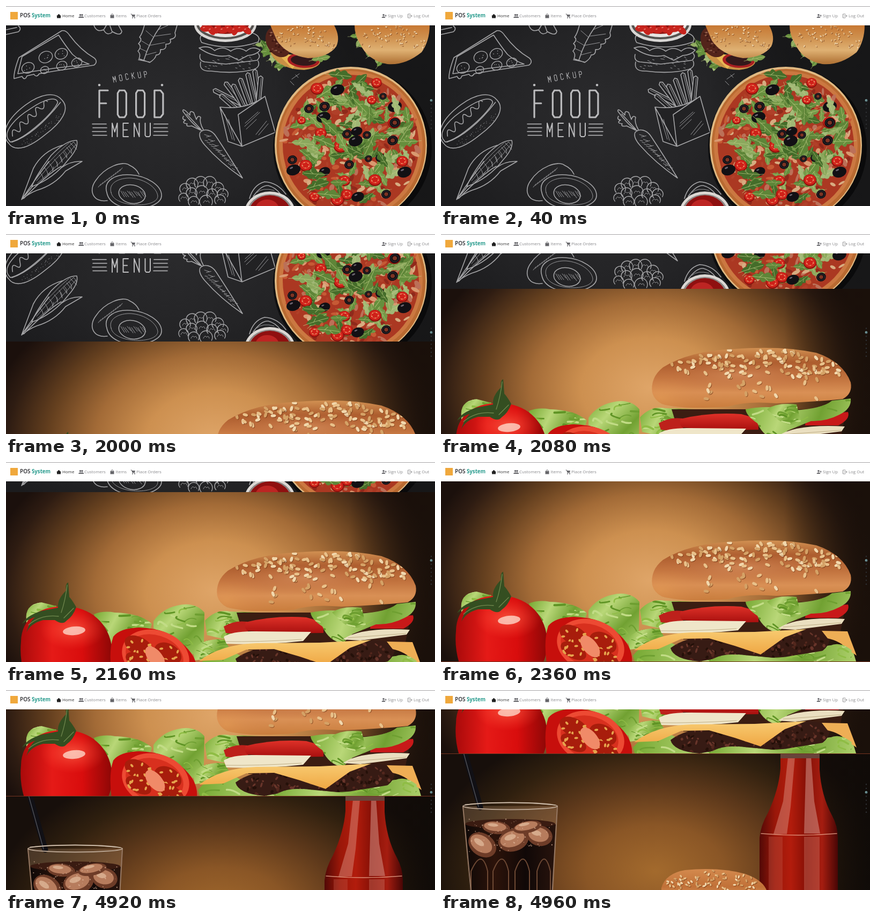
Recreate the animation shown at these times as an HTML page with a canvas. Size 800x372 px, loop 5000 ms.

```html
<!DOCTYPE html>
<html lang="en">
<head>
<meta charset="utf-8">
<title>POS System</title>
<style>
html, body { margin: 0; width: 100%; height: 100%; overflow: hidden; background: #fff; }
canvas { display: block; }
</style>
</head>
<body>
<canvas id="stage" width="800" height="372"></canvas>
<script>
const W = 800, H = 372, TOP = 36, PAGE = H - TOP, LOOP = 5000, STEP = 40;
const stage = document.getElementById('stage').getContext('2d');
const CHALK = '#a5a5a7';
let g = stage, seed = 7;

function rnd(a = 0, b = 1) {
  seed = (seed * 16807) % 2147483647;
  return a + (b - a) * seed / 2147483647;
}
const pick = list => list[Math.floor(rnd(0, list.length))];

function fill(color, d) { g.fillStyle = color; g.fill(new Path2D(d)); }
function line(color, w, d) { g.strokeStyle = color; g.lineWidth = w; g.stroke(new Path2D(d)); }
function oval(color, x, y, rx, ry = rx, rot = 0) {
  g.fillStyle = color;
  g.beginPath(); g.ellipse(x, y, rx, ry, rot, 0, 7); g.fill();
}
function ring(color, w, x, y, rx, ry = rx, rot = 0) {
  g.strokeStyle = color; g.lineWidth = w;
  g.beginPath(); g.ellipse(x, y, rx, ry, rot, 0, 7); g.stroke();
}
function box(color, x, y, w, h) { g.fillStyle = color; g.fillRect(x, y, w, h); }
function shade(x0, y0, x1, y1, ...colors) {
  const s = g.createLinearGradient(x0, y0, x1, y1);
  colors.forEach((c, i) => s.addColorStop(i / (colors.length - 1), c));
  return s;
}
function at(x, y, rot, scale, draw) {
  g.save(); g.translate(x, y); g.rotate(rot); g.scale(scale, scale); draw(); g.restore();
}
function clipped(d, draw) { g.save(); g.clip(new Path2D(d)); draw(); g.restore(); }
function glow(x, y, rx, ry, stops) {
  g.save(); g.translate(x, y); g.scale(rx, ry);
  const r = g.createRadialGradient(0, 0, 0, 0, 0, 1);
  stops.forEach(([p, c]) => r.addColorStop(p, c));
  g.fillStyle = r; g.fillRect(-9, -9, 18, 18); g.restore();
}
function layer(draw) {
  const c = document.createElement('canvas');
  c.width = W; c.height = H;
  g = c.getContext('2d');
  g.lineJoin = g.lineCap = 'round';
  draw();
  return c;
}

// Chalk lettering, each glyph in a unit box
const GLYPHS = {
  M: [[0, 1], [0, 0], [.5, .65], [1, 0], [1, 1]], N: [[0, 1], [0, 0], [1, 1], [1, 0]],
  O: [[.2, 0], [.8, 0], [1, .1], [1, .9], [.8, 1], [.2, 1], [0, .9], [0, .1], [.2, 0]],
  D: [[0, 0], [.7, 0], [1, .12], [1, .88], [.7, 1], [0, 1], [0, 0]],
  C: [[1, .2], [.8, 0], [.2, 0], [0, .1], [0, .9], [.2, 1], [.8, 1], [1, .8]],
  K: [[0, 0], [0, 1], [0, .6], [1, 0], [.3, .45], [1, 1]],
  U: [[0, 0], [0, .9], [.2, 1], [.8, 1], [1, .9], [1, 0]],
  P: [[0, 1], [0, 0], [.8, 0], [1, .12], [1, .4], [.8, .52], [0, .52]],
  E: [[1, 0], [0, 0], [0, .5], [.8, .5], [0, .5], [0, 1], [1, 1]],
  F: [[1, 0], [0, 0], [0, .48], [.8, .48], [0, .48], [0, 1]]
};
function letter(ch, x, y, w, h, weight) {
  g.strokeStyle = '#bcbcbe'; g.lineWidth = weight;
  g.beginPath();
  GLYPHS[ch].forEach(([u, v]) => g.lineTo(x + u * w, y + v * h));
  g.stroke();
}

function lettering() {
  [...'MOCKUP'].forEach((ch, i) =>
    at(202 + i * 11.6, 135 - i * 1.8 + (i - 2.5) ** 2 * .2, -.2, 1, () => letter(ch, -2, -5.5, 4.5, 11, 1)));
  [...'FOOD'].forEach((ch, i) => letter(ch, 174 + i * 34.3, 157, 16, 50, 3.2));
  [...'MENU'].forEach((ch, i) => letter(ch, 198 + i * 20.5, 218, 9.5, 25, 2));
  oval('#bcbcbe', 174, 147, 2.3);
  oval('#bcbcbe', 291, 147, 2.3);
  for (let i = 0; i < 4; i++) {
    line('#bcbcbe', 1.6, `M${161 + i % 2} ${219.5 + i * 7}h26M${276 - i % 2} ${219.5 + i * 7}h26`);
  }
}

function chalkFood() {
  const c = d => line(CHALK, 1.6, d), thin = d => line(CHALK, .9, d);
  // slice of pizza
  c('M104 46Q112 44 119 55Q139 82 165 97Q172 104 164 110L91 121L62 126Q57 134 52 127L39 130Q35 140 30 131L15 135Q14 123 24 96Z');
  c('M98 54Q111 74 124 90Q139 103 155 108M98 54L30 94L22 126L88 116L155 108');
  [[41, 115, 12], [74, 95, 13], [103, 89, 12], [72, 119, 8], [104, 111, 10], [132, 105, 10]].forEach(([x, y, r]) => {
    ring(CHALK, 1.4, x, y, r, r * .8, -.4);
    for (let i = 0; i < 4; i++) oval(CHALK, x + rnd(-r, r) * .55, y + rnd(-r, r) * .5, .8);
  });
  // hot dog
  at(53, 213, -.66, 1, () => {
    c('M-64 4C-66-22-35-34 5-33C39-32 64-20 64 2C66 24 38 34 0 33C-37 34-65 26-64 4Z');
    c('M-60-3C-58-21-22-25 6-22C42-20 60-10 55 0C40 10-34 17-60 4Z');
    c('M-58 6Q-15 21 59 3');
    c('M-50-2q8-15 12-3q4 10 10-3q6-12 10 1q5 9 11-4q6-10 9 2q6 10 11-4q5-9 9 2q5 8 11-3q5-7 8 1');
    for (let i = 0; i < 42; i++) oval(CHALK, rnd(-46, 46), rnd(18, 29), .55);
  });
  // corn
  c('M132 250Q112 249 84 278Q54 318 48 336Q89 321 116 286Q136 264 132 250Z');
  c('M105 259Q68 270 51 302L29 360Q42 349 57 343Q91 333 111 307L142 289Q119 288 103 301M29 360Q53 324 80 289M33 358Q78 312 103 298M50 335L35 353');
  for (let i = 0; i < 8; i++) thin(`M${126 - i * 9} ${253 + i * 8}q${7 - i * .2} 6 ${5 + i * .2} 12M${119 - i * 6} ${254 + i * 9}L${132 - i * 9} ${267 + i * 8}`);
  thin('M126 253Q90 285 57 325M130 258Q101 295 59 329M117 255Q80 286 52 326');
  // avocado
  c('M189 362C163 366 153 344 167 325C184 299 218 287 230 296Q243 302 248 313');
  c('M188 347C181 325 204 312 232 314C264 316 289 334 290 351C293 382 196 390 188 347Z');
  thin('M196 347C190 329 212 319 233 320C260 322 281 338 283 353C284 377 201 376 196 347Z');
  ring(CHALK, 1.6, 235, 350, 25, 17, .2);
  for (let i = 0; i < 11; i++) thin(`M${214 + i * 4} ${344 + i % 3}l${7} ${11 - i % 4}M${172 + i * 4} ${337 - i * 3}l5-6`);
  // cauliflower
  [[334, 340, 10], [347, 331, 11], [363, 329, 12], [380, 329, 12], [395, 339, 11], [404, 350, 10], [331, 357, 9], [399, 361, 10], [346, 348, 10], [365, 346, 12], [384, 350, 10], [350, 364, 10], [373, 364, 12]].forEach(([x, y, r]) => {
    g.strokeStyle = CHALK; g.lineWidth = 1.4;
    g.beginPath(); g.arc(x, y, r, 2.4, 6.8); g.stroke();
    thin(`M${x - 5} ${y + 2}q3-7 6-2q4-4 5 2`);
  });
  // carrot
  c('M362 235C370 227 384 230 392 243Q416 279 441 320Q399 291 371 259C364 251 359 242 362 235Z');
  c('M366 232Q351 224 330 196Q329 190 336 196L343 203Q342 193 350 198L355 211Q358 202 363 207Q360 216 368 230M331 205Q327 211 335 212Q326 218 338 219Q334 225 346 223L363 231M337 201L363 229');
  for (let i = 0; i < 15; i++) thin(`M${370 + i * 3.7} ${239 + i * 4.5}l${9 - i * .3} ${i % 2 ? -2 : 3}M${371 + i * 4} ${250 + i * 3.6}l5 1`);
  // fries
  const fry = (x, y, rot, len) => at(x, y, rot, 1, () => {
    box('#222224', -4, 0, 8, len);
    c(`M-4 0L0-3L4 0V${len}H-4Z`); thin(`M1 1V${len}`);
  });
  fry(389, 157, -1.1, 58); fry(410, 144, -.65, 58); fry(424, 148, -.45, 52); fry(437, 137, -.35, 58);
  fry(451, 127, -.24, 62); fry(464, 121, -.15, 62); fry(475, 133, .1, 48); fry(401, 167, -.85, 45);
  fill('#222224', 'M399 188Q448 194 483 168L502 235L440 261L414 252Z');
  c('M399 188Q448 194 483 168L502 235L440 261L414 252ZM399 188L440 261M433 202L440 261M433 202L483 168');
  thin('M446 218l24-21M445 224l28-26M448 229l19-18M466 239l20-25M471 240l18-21M408 202l14 46M415 211l11 39');
  // burger
  c('M365 68Q356 54 376 49H456Q477 55 470 67Q418 85 365 68ZM360 78Q378 72 389 83Q404 73 419 84Q433 74 448 84Q460 73 474 82Q467 91 451 92L434 101L416 92Q389 98 360 78ZM362 90Q359 102 371 104L410 108L468 101Q476 94 470 88M363 104Q359 122 382 121Q427 127 462 118Q475 113 470 102');
  for (let i = 0; i < 32; i++) thin(`M${rnd(366, 464)} ${rnd(94, 118)}l3 .8`);
  // lettuce
  c('M258 36Q254 52 249 58Q255 62 247 70Q254 75 246 84Q252 89 248 98L268 105Q279 98 280 91Q289 91 288 81Q300 82 298 71Q310 71 306 62Q319 60 315 50L319 36M247 100L267 104M257 101Q267 67 289 36');
  thin('M263 85L250 79M268 74L253 65M275 58L261 46M261 91L280 86M269 73L296 68M278 56L307 52M284 44L302 36');
  c('M0 53L23 48Q30 42 23 37M1 44L20 40M164 36Q169 50 182 44Q188 57 199 48Q214 57 216 47L210 36M183 43l4-7M198 48l-4-11');
  c('M454 358Q461 333 482 327Q506 328 522 350M461 354Q476 333 489 334Q502 337 512 350');
  thin('M468 347Q478 337 500 343M533 136l14-10M530 140l7 7M540 128l5 5');
}

function leaf(x, y, rot, size) {
  at(x, y, rot, size, () => {
    fill(pick(['#5e8538', '#759a49', '#456d2a', '#8ba85d', '#668f3d', '#a0b775']),
      'M-14 0Q-9-5-6-3Q-4-10 1-4Q7-9 10-3Q14-2 16 1Q10 7 4 4Q0 9-4 3Q-8 5-14 0Z');
    line('rgba(190,204,131,.7)', .7, 'M-18 1Q-5 0 14 1M-5 1l4-4M2 1l4 3');
  });
}
function tomato(x, y, r, rot) {
  oval('#8b120d', x, y + 1, r, r * .92);
  oval('#cf2119', x, y, r * .9, r * .82);
  ring('#e9604a', 1, x, y, r * .56, r * .48);
  for (let i = 0; i < 5; i++) oval('#eda26f', x + Math.cos(rot + i * 1.25) * r * .52, y + Math.sin(rot + i * 1.25) * r * .45, 1.4, .9);
}
function olive(x, y, r, whole) {
  oval('#121014', x, y, r * (whole ? 1.2 : 1), r * .9, -.3);
  if (whole) oval('#6b6470', x - r * .35, y - r * .35, r * .3, r * .14, -.4);
  else { oval('#7d3323', x, y, r * .4, r * .38); ring('#3d343a', .9, x, y, r * .75, r * .66); }
}
function pizza() {
  oval('rgba(0,0,0,.55)', 646, 264, 148, 149);
  oval('#e0b982', 643, 259, 142, 146);
  oval('#b96a31', 643.5, 260, 139, 143);
  oval('#cb7841', 643, 259, 134, 138);
  oval('#ab3822', 643, 259, 127, 131);
  for (let i = 0; i < 300; i++) {
    const a = rnd(0, 6.28), r = Math.sqrt(rnd()) * 126;
    oval(pick(['#c65a35', '#d99970', '#b04029', '#8f291b', '#d7ac81', '#bc7058']),
      643 + Math.cos(a) * r, 259 + Math.sin(a) * r, rnd(2, 10), rnd(2, 5), rnd(0, 3));
  }
  const scatter = n => {
    for (let i = 0; i < n; i++) {
      const a = rnd(0, 6.28), r = Math.sqrt(rnd()) * 108;
      leaf(650 + Math.cos(a) * r, 250 + Math.sin(a) * r * 1.04, rnd(0, 6.28), rnd(.7, 1.5));
    }
  };
  scatter(95);
  [[580, 153, 12], [691, 142, 10], [624, 260, 13], [739, 288, 11], [724, 216, 12], [631, 324, 11], [587, 236, 11],
   [551, 212, 8], [559, 296, 12], [688, 323, 12], [682, 174, 9], [575, 354, 10], [636, 350, 11], [618, 360, 12]]
    .forEach(([x, y, r], i) => tomato(x, y, r, i));
  [[618, 156, 11, 1], [725, 187, 11, 1], [592, 207, 11, 1], [565, 191, 9], [594, 187, 10], [725, 217, 10], [652, 251, 11, 1],
   [536, 305, 11, 1], [534, 286, 9], [656, 355, 10, 1], [743, 309, 11, 1], [709, 350, 9], [636, 238, 9], [698, 282, 9],
   [721, 250, 10], [594, 308, 9, 1], [640, 295, 9], [673, 240, 8], [654, 233, 9, 1], [703, 168, 7], [676, 284, 7]]
    .forEach(o => olive(...o));
  [[655, 143, -.8], [622, 128, .1], [663, 187, .8], [745, 233, -1], [569, 263, 1], [592, 251, .4], [712, 292, 1.3], [580, 333, -.3], [601, 350, .1], [679, 258, 2]]
    .forEach(([x, y, a]) => leaf(x, y, a, 1.5));
  scatter(14);
}

function seeds(n, x0, x1, y0, y1, size) {
  for (let i = 0; i < n; i++) {
    const x = rnd(x0, x1), u = (x - x0) / (x1 - x0) * 2 - 1;
    const y = y0 + u * u * (y1 - y0) * .55 + rnd() ** 1.3 * (y1 - y0) * (1 - u * u * .35), a = rnd(-.6, 2);
    oval('rgba(105,48,18,.55)', x + 1, y + 1, size, size * .6, a);
    oval(pick(['#e9c18a', '#f2d8ad', '#d5a266']), x, y, size, size * .55, a);
  }
}

function menuPage() {
  box('#202022', 0, 0, W, H);
  glow(310, 200, 370, 260, [[0, '#2b2b2d'], [.6, '#242426'], [1, '#1c1c1e']]);
  box(shade(500, 0, 800, 0, 'rgba(16,16,17,0)', '#171718'), 500, 36, 300, 336);
  chalkFood();
  lettering();
  // bowl of tomatoes
  oval('#d9d7d5', 409, 35, 58, 32);
  oval('#55524f', 409, 33, 54, 29);
  oval('#e8e5e2', 409, 31, 50, 27);
  oval('#8d1713', 409, 30, 46, 22);
  for (let i = 0; i < 8; i++) {
    oval('#c7241d', 372 + i * 11, 42 + i % 2 * 3, 10, 6, i);
    oval('#e5776a', 369 + i * 11, 40 + i % 2 * 3, 2, 1, -.4);
  }
  // burgers
  for (let i = 0; i < 10; i++) leaf(480 + i * 4, 72 + i * 4, i, 1.1);
  fill('#c99045', 'M487 67L515 89L585 94Q594 114 556 119Q513 118 495 91Z');
  fill('#e7b654', 'M497 79L550 98L534 117Z');
  oval('#53241b', 508, 67, 22, 30, -.5);
  for (let i = 0; i < 40; i++) oval(pick(['#754034', '#91604b', '#3c1712']), rnd(490, 521), rnd(46, 88), 2, 1.4);
  oval('#a91f22', 555, 101, 30, 14, .06);
  oval('#34191b', 555, 101, 24, 10, .06);
  leaf(586, 97, -.2, 1.2);
  const bun = (d, x0, x1) => {
    fill(shade(0, 36, 0, 105, '#c77833', '#cf914f', '#dfb173', '#b37639'), d);
    clipped(d, () => seeds(58, x0, x1, 37, 74, 2));
  };
  bun('M493 36H612Q624 58 616 75Q601 96 563 97Q523 91 505 64Z', 500, 614);
  for (let i = 0; i < 10; i++) leaf(657 + i * 5, 56 + i * 5, i * 2, 1.1);
  bun('M650 36H790Q790 65 775 86Q744 111 711 108Q674 101 660 70Q650 53 650 36Z', 658, 782);
  pizza();
  // sauce bowl
  oval('#dcd8d4', 492, 384, 47, 39);
  oval('#8b8583', 492, 386, 43, 36);
  oval('#8f1010', 492, 388, 40, 36);
  oval('#bd2523', 487, 378, 22, 18);
}

const GREENS = ['#5f9425', '#8fbd45', '#c2dc86', '#6e9f31'];
function lettuce(d, x0, y0, x1, y1) {
  fill(shade(x0, y0, x1, y1, '#75a832', '#b9d778', '#71a132', '#a9cd67'), d);
  clipped(d, () => {
    for (let i = 0; i < 22; i++) {
      const x = rnd(x0, x1), y = rnd(y0, y1);
      line(pick(GREENS), rnd(1, 4), `M${x} ${y}q${rnd(-8, 12)} ${rnd(-10, 4)} ${rnd(12, 26)} ${rnd(-8, 10)}`);
    }
  });
}

function burgerPage() {
  glow(390, 220, 430, 310, [[0, '#dfa568'], [.3, '#cd9050'], [.52, '#a36b37'], [.72, '#65401f'], [.9, '#2e1c12'], [1, '#1b100c']]);
  box(shade(640, 0, 800, 0, 'rgba(24,14,8,0)', '#1a100a'), 640, 36, 160, 336);
  lettuce('M38 275Q34 245 66 241L94 248L83 284H38Z', 38, 240, 95, 285);
  lettuce('M164 263Q182 256 203 260Q250 261 272 281L260 318H180Z', 165, 258, 272, 315);
  lettuce('M275 276Q291 253 319 247Q352 239 370 260L369 316L349 338L307 307L275 289Z', 275, 244, 370, 335);
  lettuce('M348 328Q368 307 407 310L425 340L352 349Z', 350, 307, 420, 347);
  lettuce('M371 275Q392 253 417 258L474 260L463 284L405 309L375 302Z', 371, 256, 474, 308);
  // whole tomato
  const body = 'M28 314C29 269 65 247 111 249C156 249 193 279 198 328Q199 356 190 374H34Q25 345 28 314Z';
  fill(shade(30, 0, 198, 0, '#ac0b0b', '#e51a17', '#d90d0d', '#8d0706'), body);
  clipped(body, () => glow(125, 291, 62, 38, [[0, 'rgba(255,105,77,.7)'], [1, 'rgba(255,70,50,0)']]));
  oval('rgba(255,224,210,.75)', 127, 294, 21, 8, -.1);
  fill('#344e21', 'M92 260Q78 259 64 263Q46 269 38 297Q46 280 69 274L91 274Q106 284 113 275Q125 267 131 250Q123 236 118 231L116 204Q110 206 112 219Q95 236 97 251L66 257Q38 266 30 281Q48 267 69 266Z');
  line('#71884f', 1.3, 'M114 209Q111 236 103 260M98 267Q65 263 42 283M108 270L126 252');
  // half tomato
  const cut = 'M200 305Q212 289 248 288Q300 289 328 317Q359 343 356 374H197Q191 332 200 305Z';
  fill('#c70f0c', cut);
  oval('#ed4a33', 279, 341, 64, 48, .3);
  oval('#d8301e', 277, 341, 55, 39, .3);
  [[248, 323, 29, 17], [302, 336, 27, 18], [247, 351, 26, 14], [306, 365, 28, 14]].forEach(([x, y, rx, ry], i) => {
    oval('#a81d0c', x, y, rx, ry, .5);
    for (let k = 0; k < 9; k++) oval('#e6a44d', x + Math.cos(k + i) * rx * .7, y + Math.sin(k + i) * ry * .65, 3.6, 2, k);
  });
  oval('#f08a68', 278, 343, 13, 24, -.7);
  // burger filling
  fill('#3b1d12', 'M430 260H756L742 330H452Z');
  fill('#bd211b', 'M406 286Q425 274 450 277L452 302L410 298Z');
  fill(shade(0, 266, 0, 300, '#e2332a', '#a50e0d'), 'M447 278Q501 265 560 269L592 278V298Q516 299 450 294Q443 287 447 278Z');
  fill('#c81919', 'M681 273L759 265Q764 278 741 290H679Z');
  lettuce('M568 260Q610 251 659 262Q711 259 729 244L764 240Q766 259 743 270Q718 283 690 282L646 300L628 317Q602 313 590 286Q569 272 568 260Z', 570, 242, 764, 315);
  lettuce('M608 260Q626 247 663 251L671 282Q656 296 629 280Z', 610, 249, 670, 289);
  fill('#efe6c9', 'M406 305Q422 294 465 295L569 296L554 313Q480 321 411 318Z');
  fill('#eadfc0', 'M628 310Q661 287 753 292L747 301L661 312Z');
  line('#bfae86', 1, 'M409 314Q467 315 551 310M638 307L746 299');
  lettuce('M358 360Q386 326 421 332L470 357H650Q721 336 765 341L775 374H362Z', 360, 333, 770, 373);
  const patty = 'M428 346Q456 325 506 323L661 312Q717 307 725 327Q724 349 695 360L617 364L555 358L482 371Q433 367 428 346Z';
  fill('#371b14', patty);
  clipped(patty, () => {
    for (let i = 0; i < 150; i++) oval(pick(['#68352a', '#241009', '#53271d']), rnd(430, 725), rnd(314, 368), rnd(2, 5), rnd(1, 3), rnd(0, 3));
  });
  fill(shade(0, 306, 0, 358, '#f9cf76', '#efa744'), 'M360 350Q401 319 467 317L585 316L681 311L641 326L596 358L548 342L500 328L448 329L405 348Z');
  fill('#eeae55', 'M710 314L758 315L775 360L760 350Q745 333 721 328Z');
  lettuce('M496 374Q519 354 558 359L627 365L713 351Q736 327 766 350L762 374Z', 498, 340, 765, 373);
  box('#753421', 0, 371, 800, 1);
  // top bun
  const bun = 'M394 229Q390 201 414 182Q464 151 546 148Q635 141 700 155Q750 172 764 210Q768 231 749 241Q699 246 625 249Q570 244 536 255Q447 261 412 250Q398 243 394 229Z';
  fill(shade(0, 145, 0, 257, '#d29253', '#ad5d2e', '#c0713d', '#d99055', '#c97d3d'), bun);
  clipped(bun, () => {
    glow(560, 196, 168, 32, [[0, 'rgba(223,154,107,.5)'], [1, 'rgba(190,104,62,0)']]);
    glow(410, 238, 90, 55, [[0, 'rgba(228,155,84,.55)'], [1, 'rgba(208,126,70,0)']]);
    seeds(110, 425, 742, 148, 194, 5);
    seeds(24, 480, 735, 190, 238, 5);
  });
}

function colaPage() {
  g.translate(0, -86);
  glow(400, 340, 430, 285, [[0, '#a36a2d'], [.3, '#8a5626'], [.55, '#5e391b'], [.8, '#30200f'], [1, '#170f0b']]);
  box(shade(620, 0, 800, 0, 'rgba(15,9,6,0)', '#100b08'), 620, 122, 180, 336);
  // glass
  fill('rgba(205,165,127,.23)', 'M40 219H218L205 458H61Z');
  line('#111015', 11, 'M43 116L73 221');
  line('#53545b', 1.3, 'M41 116L70 220');
  fill(shade(42, 0, 216, 0, '#0d0807', '#2c130a', '#100807', '#29140d'), 'M44 253Q129 238 214 253L205 458H61Z');
  oval('#3a1b11', 129, 252, 84, 9);
  [[77, 291, 28, 21, .6], [135, 282, 29, 21, -.3], [184, 274, 24, 19, .2], [103, 259, 26, 12, .1], [161, 258, 27, 11, -.2]].forEach(([x, y, rx, ry, a]) => {
    oval('#6e3c28', x, y, rx, ry, a);
    oval('#b77c5d', x - 2, y - 2, rx * .8, ry * .7, a);
    oval('#d6aa8b', x - 6, y - 5, rx * .38, ry * .25, a);
  });
  for (let i = 0; i < 80; i++) oval('rgba(226,185,156,.65)', rnd(50, 209), rnd(242, 305), rnd(.5, 1.3));
  for (let i = 0; i < 4; i++) {
    line('#6e4934', 2, `M${56 + i * 41} 380V340Q${76 + i * 39} 295 ${87 + i * 39} 340V380`);
  }
  line('#957762', 2, 'M41 220L57 388M217 220L207 388');
  ring('#b6a18e', 2, 129, 219, 88, 6.5);
  line('#ded0be', 1, 'M45 216Q129 208 213 217');
  // bottle
  const bottle = 'M633 122H706V151Q709 199 729 236Q740 256 740 278V458H594V278Q596 255 610 231Q630 188 633 149Z';
  fill(shade(594, 0, 740, 0, '#520906', '#9a1709', '#b21c0c', '#861006', '#a51d10', '#480605'), bottle);
  clipped(bottle, () => {
    fill('rgba(215,137,122,.5)', 'M647 128H660L652 220L645 271H620L638 210Z');
    fill('rgba(211,145,133,.55)', 'M681 126H690L696 210L707 270H677Z');
    box('rgba(199,98,80,.3)', 611, 276, 26, 180);
    box('rgba(205,122,105,.38)', 677, 276, 29, 180);
    line('rgba(237,170,145,.8)', 1.5, 'M597 270Q666 276 738 270');
    box('#68443a', 632, 122, 75, 8);
  });
  const bun = 'M411 371Q419 344 455 338Q519 332 567 345Q602 357 608 378L606 430H412Z';
  fill(shade(0, 337, 0, 400, '#d3894d', '#c17138', '#dca067'), bun);
  clipped(bun, () => seeds(70, 422, 597, 339, 375, 3));
}

const pages = [menuPage, burgerPage, colaPage].map(layer);

function text(str, x, size, color, weight = 400) {
  g.font = `${weight} ${size}px "Open Sans", "Noto Sans", sans-serif`;
  g.fillStyle = color;
  g.fillText(str, x, 21.3);
}
function person(x, color) {
  oval(color, x, 16.8, 1.8);
  fill(color, `M${x - 3.3} 22v-1q3.3-3.4 6.6 0v1Z`);
}
const header = layer(() => {
  const grey = '#87878a', icon = '#66666a';
  box('#fff', 0, 0, W, TOP);
  box('#a4a2a4', 0, 0, W, 1);
  box('#f0a83c', 8, 11, 14, 14);
  text('POS', 26, 10, '#252529', 600);
  text('System', 48, 9.7, '#279b8d', 700);
  fill('#222', 'M94 19L98.5 14.8L103 19H102V22.5H95V19Z');
  text('Home', 105, 7.9, '#333');
  person(138.5, icon); person(142, icon);
  text('Customers', 146, 7.9, grey);
  box(icon, 194.5, 17, 7, 5.5);
  line(icon, 1, 'M196 17v-1q2-3 4 0v1');
  text('Items', 204.5, 7.9, grey);
  line(icon, 1, 'M233 15h1.5l1.5 5h4.5');
  fill(icon, 'M234.5 16h6.5l-1 3.5h-4.5Z');
  oval(icon, 236, 22, 1); oval(icon, 240, 22, 1);
  text('Place Orders', 243, 7.9, grey);
  person(704, icon);
  line(icon, .9, 'M706.5 18h3M708 16.5v3');
  text('Sign Up', 712, 7.9, grey);
  line(grey, .9, 'M754 16v-1h-4.5v7h4.5v-1M752 18.5h5M755.5 17l1.5 1.5l-1.5 1.5');
  text('Log Out', 760, 7.9, grey);
});

// cubic-bezier(.25, .1, .25, 1)
function ease(p) {
  if (p <= 0) return 0;
  if (p >= 1) return 1;
  let lo = 0, hi = 1, s = .5;
  for (let i = 0; i < 24; i++) {
    s = (lo + hi) / 2;
    if (.75 * s * (1 - s) + s ** 3 < p) lo = s; else hi = s;
  }
  return .3 * (1 - s) ** 2 * s + 3 * (1 - s) * s * s + s ** 3;
}

function frame() {
  const t = Math.floor(performance.now() % LOOP / STEP) * STEP;
  const scroll = Math.round(PAGE * (ease((t - 1880) / 400) + ease((t - 4840) / 264)));
  const active = t < 1920 ? 0 : t < 4840 ? 1 : 2;
  g = stage;
  g.save();
  g.beginPath(); g.rect(0, TOP, W, PAGE); g.clip();
  pages.forEach((p, i) => g.drawImage(p, 0, TOP, W, PAGE, 0, TOP + i * PAGE - scroll, W, PAGE));
  for (let i = 0; i < 8; i++) oval('#303235', 793, 175.5 + i * 7.4, 1.2);
  oval('#57777b', 793, 175.5 + active * 7.4, 2.5);
  oval('#9bc2c1', 792.5, 175 + active * 7.4, 1);
  g.restore();
  g.drawImage(header, 0, 0, W, TOP, 0, 0, W, TOP);
  requestAnimationFrame(frame);
}
frame();
</script>
</body>
</html>
```
